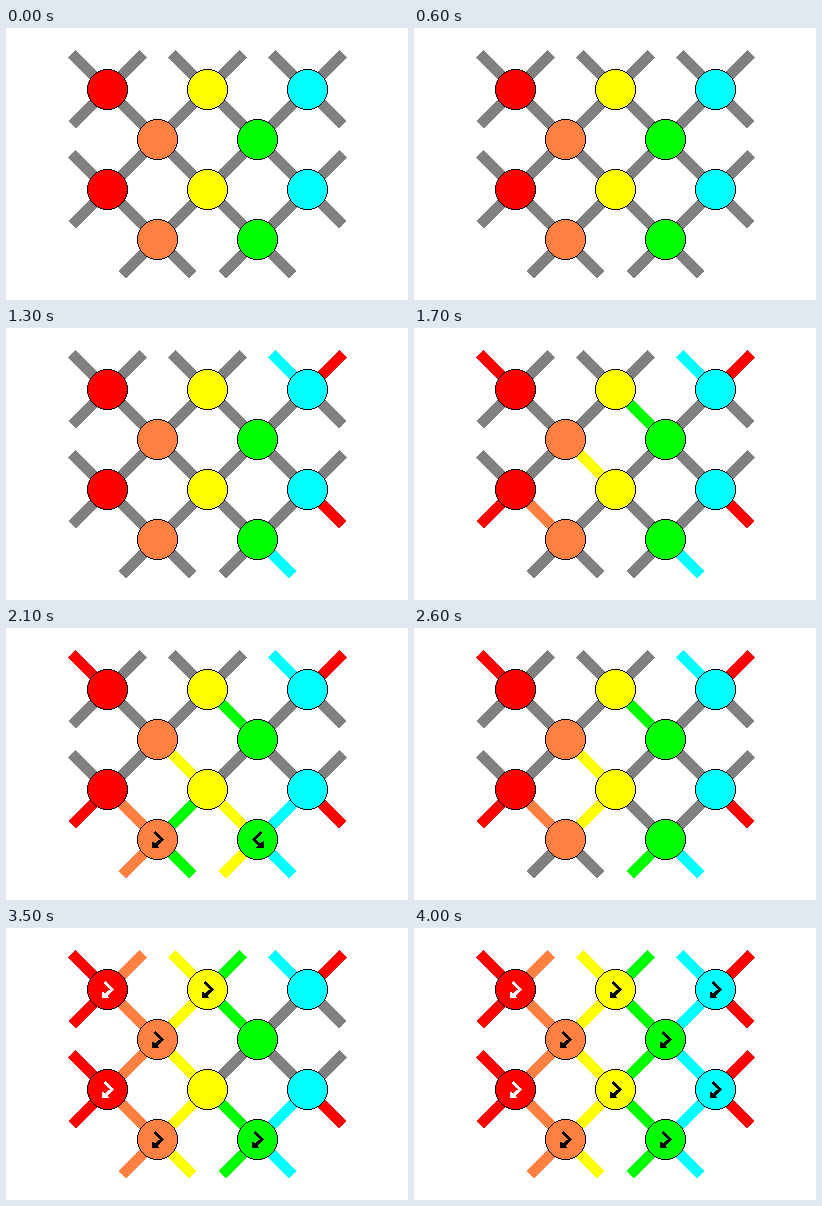
Write an HTML page that moves like this. It is 402 px wide and 272 px high and loops after 4.1 s.

```html
<!DOCTYPE html>
<html lang="en">
<head>
<meta charset="utf-8">
<title>Knot pattern solver</title>
<style>
html, body { margin: 0; width: 100%; height: 100%; overflow: hidden; background: #fff; }
svg { display: block; shape-rendering: crispEdges; }
line { stroke-width: 10; }
circle { stroke: #000; stroke-width: 1; }
</style>
</head>
<body>
<svg id="stage" width="402" height="272" viewBox="0 0 402 272"></svg>
<script>
const STEP = 100, GAP = 50, LEFT = 101.5, TOP = 61.5, STUB = 35.5;
const COLORS = { '-': '#808080', r: '#ff0000', o: '#ff8040', y: '#ffff00', g: '#00ff00', c: '#00ffff' };
const KNOTS = 'roygc';

// One entry per step. "50r": lane 5, band 0 turns red. "k13>": knot in column 1, row 3 gets an arrow.
const STEPS = `|50r 53r|50- 53-|50r 53r|50- 53-|50r 53r|50- 53-
|50r 53r|40c|40-|40c|40-|40c
|44c|00r 03r|31g|22y|13o|14o
|23g 33y|24g k13>|34y 43c k33<|30y|20g|10o
|10- 20- 30- 14- 24- 34- 33- 43- 23y k13- k33-|34g|33g|24y|20y|21y
|43c 30g k33> k20>|14o 10o k13>|01r 02r 11o k00>|12o k11>|k02>|32g k22>
|41c 42c k31>|51r k40>|52r|k42>`.split('|').map(s => s.trim().split(/\s+/).filter(Boolean));

const stage = document.getElementById('stage');
const parts = {};

function add(tag, attrs) {
  const el = document.createElementNS('http://www.w3.org/2000/svg', tag);
  for (const name in attrs) el.setAttribute(name, attrs[name]);
  return stage.appendChild(el);
}

// A strand crosses its cell diagonally; at the border it is cut short.
function addStrand(lane, band) {
  const down = (lane + band) % 2 === 0 ? 1 : -1;
  const midX = LEFT + (lane - 0.5) * GAP, midY = TOP + (band - 0.5) * GAP;
  let from = -GAP / 2, to = GAP / 2;
  const cut = GAP - STUB;
  const trimStart = lane === 0 || (band === 0 && down > 0) || (band === 4 && down < 0);
  const trimEnd = lane === 5 || (band === 0 && down < 0) || (band === 4 && down > 0);
  if (trimStart) from += cut;
  if (trimEnd) to -= cut;
  parts[`${lane}${band}`] = add('line', {
    x1: midX + from, y1: midY + from * down,
    x2: midX + to, y2: midY + to * down
  });
}

function addKnot(col, row) {
  const x = LEFT + col * GAP, y = TOP + row * GAP;
  add('circle', { cx: x, cy: y, r: 20, fill: COLORS[KNOTS[col]] });
  const ink = col === 0 ? '#fff' : '#000';
  const arrow = add('path', {
    d: 'M-4.5 -6.5L-2.5 -8.5L6 0L0 6L1.5 8.5H-6V1.5L-2.5 4L2 0Z',
    fill: ink
  });
  arrow.place = `translate(${x} ${y})`;
  parts[`k${col}${row}`] = arrow;
}

for (let band = 0; band < 5; band++)
  for (let lane = 0; lane < 6; lane++)
    if (band < 4 || (lane > 0 && lane < 5)) addStrand(lane, band);

for (let row = 0; row < 4; row++)
  for (let col = row % 2; col < 5; col += 2) addKnot(col, row);

function reset() {
  for (const id in parts) {
    if (id[0] === 'k') parts[id].setAttribute('visibility', 'hidden');
    else parts[id].setAttribute('stroke', COLORS['-']);
  }
}

function apply(token) {
  const el = parts[token.slice(0, -1)], value = token.slice(-1);
  if (token[0] !== 'k') {
    el.setAttribute('stroke', COLORS[value]);
    return;
  }
  el.setAttribute('visibility', value === '-' ? 'hidden' : 'visible');
  el.setAttribute('transform', el.place + (value === '<' ? ' scale(-1 1)' : ''));
}

let shown = -1;
function show(step) {
  if (step === shown) return;
  shown = step;
  reset();
  for (let i = 0; i <= step; i++) STEPS[i].forEach(apply);
}

const start = performance.now();
function tick() {
  const time = performance.now() - start;
  show(Math.floor(time / STEP) % STEPS.length);
  requestAnimationFrame(tick);
}
tick();
</script>
</body>
</html>
```
